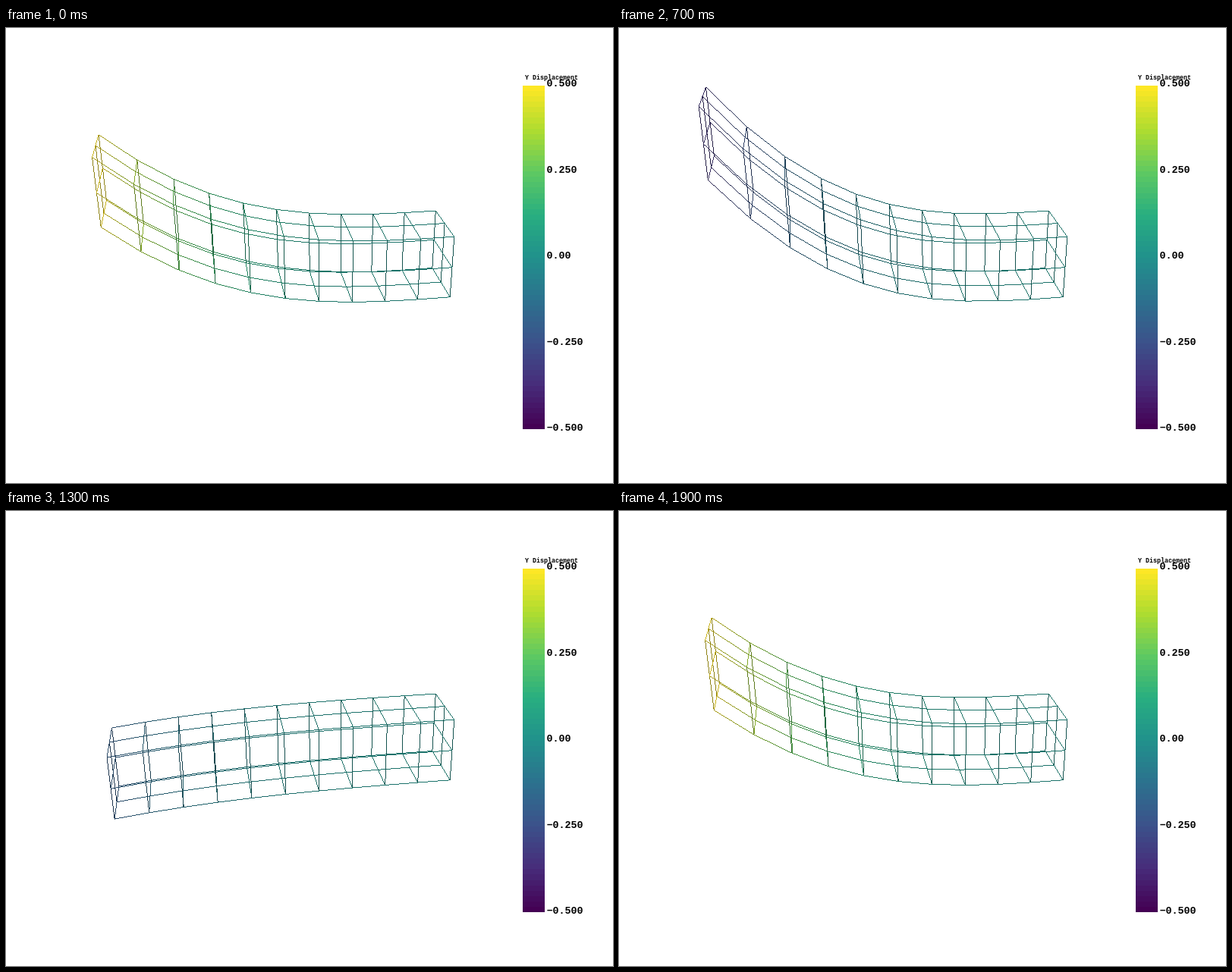
An HTML page with a canvas for the animation above (2 s loop, 800 by 600 pixels).

```html
<!DOCTYPE html>
<html lang="en">
<head>
<meta charset="utf-8">
<title>Beam vibration</title>
<style>
  html, body { margin: 0; width: 100%; height: 100%; overflow: hidden; background: #fff; }
  canvas { display: block; }
</style>
</head>
<body>
<canvas id="stage" width="800" height="600"></canvas>
<script>
const ctx = document.getElementById('stage').getContext('2d');
const STEPS = 20, STEP_MS = 100;
const CELLS = 10, CELL = 0.5;

// Camera: position, view axes and a 30 degree vertical view angle
const EYE = [11.9151263, 6.1139275, 3.6124957];
const FOCUS = [0, 0.375, 2];
const UP = [-0.4254644, 0.9024244, -0.0678985];
const FOCAL = 300 / Math.tan(Math.PI / 12);

const dot = (a, b) => a[0] * b[0] + a[1] * b[1] + a[2] * b[2];
const sub = (a, b) => a.map((v, i) => v - b[i]);
const unit = a => a.map(v => v / Math.hypot(...a));
const cross = (a, b) => [
  a[1] * b[2] - a[2] * b[1],
  a[2] * b[0] - a[0] * b[2],
  a[0] * b[1] - a[1] * b[0]
];
const mix = (a, b, t) => a.map((v, i) => v + (b[i] - v) * t);
const css = c => `rgb(${c.map(Math.round).join(',')})`;

const BACK = unit(sub(EYE, FOCUS));
const RIGHT = cross(UP, BACK);

// Viridis colour map
const STOPS = ['440154', '472d7b', '3b528b', '2c728e', '21918c', '28ae80', '5ec962', 'addc30', 'fde725']
  .map(h => [0, 2, 4].map(i => parseInt(h.slice(i, i + 2), 16)));

function viridis(t) {
  const p = Math.min(1, Math.max(0, t)) * (STOPS.length - 1);
  const i = Math.min(STOPS.length - 2, Math.floor(p));
  return mix(STOPS[i], STOPS[i + 1], p - i);
}

// Lights fixed to the camera: key from above, fill from below, headlight
const LIGHTS = [
  { dir: [0.112, 0.766, 0.633], tint: [0.75, 0.73, 0.68] },
  { dir: [0, -0.966, 0.259], tint: [0.24, 0.25, 0.26] },
  { dir: [0, 0, 1], tint: [0.25, 0.25, 0.25] }
];

// A line is lit with the normal that faces the viewer most
function shade(a, b) {
  const d = unit(sub(b, a));
  const flat = Math.hypot(d[0], d[1]) || 1e-6;
  const n = [-d[2] * d[0] / flat, -d[2] * d[1] / flat, flat];
  const sum = [0, 0, 0];
  for (const { dir, tint } of LIGHTS) {
    const power = Math.max(0, dot(n, dir));
    tint.forEach((v, i) => sum[i] += v * power);
  }
  return sum.map(v => Math.min(1, v));
}

// Nodes are [x, y, z] grid indices; edges outline the outer cell faces
const edges = [];
const RING = [[0, 0], [1, 0], [2, 0], [2, 1], [2, 2], [1, 2], [0, 2], [0, 1]];
for (let k = 0; k <= CELLS; k++) {
  RING.forEach(([x, y], i) => {
    const [nx, ny] = RING[(i + 1) % 8];
    if (k < CELLS) edges.push([[x, y, k], [x, y, k + 1]]);
    edges.push([[x, y, k], [nx, ny, k]]);
    if ((k === 0 || k === CELLS) && i % 2) edges.push([[x, y, k], [1, 1, k]]);
  });
}

const bend = z => z ** 3 / 250;

function makeNode([i, j, k], lift, level) {
  const z = k * CELL;
  const rel = sub([i * CELL, j * CELL + bend(z) * lift, z], EYE);
  const view = [dot(rel, RIGHT), dot(rel, UP), dot(rel, BACK)];
  const scale = FOCAL / -view[2];
  return {
    view,
    pos: [400 + view[0] * scale, 300 - view[1] * scale],
    color: viridis(0.5 + bend(z) * level)
  };
}

// One-pixel line without smoothing, colours blended along its length
function drawLine(a, b) {
  const light = shade(a.view, b.view);
  const steep = Math.abs(b.pos[1] - a.pos[1]) > Math.abs(b.pos[0] - a.pos[0]);
  const m = steep ? 1 : 0;
  if (a.pos[m] > b.pos[m]) [a, b] = [b, a];
  const start = a.pos[m], span = b.pos[m] - start;
  for (let p = Math.round(start); p < Math.round(b.pos[m]); p++) {
    const t = (p + 0.5 - start) / span;
    const q = Math.floor(a.pos[1 - m] + (b.pos[1 - m] - a.pos[1 - m]) * t);
    ctx.fillStyle = css(mix(a.color, b.color, t).map((v, i) => v * light[i]));
    ctx.fillRect(steep ? q : p, steep ? p : q, 1, 1);
  }
}

function drawBeam(step) {
  // Every step adds its displacement to the shape so far
  let lift = 2, level = 0;
  for (let i = 0; i <= step; i++) {
    level = Math.cos(2 * Math.PI * i / (STEPS - 1));
    lift += level;
  }
  for (const [p, q] of edges) drawLine(makeNode(p, lift, level), makeNode(q, lift, level));
}

function drawScale() {
  const bands = 64, top = 76, height = 453;
  for (let i = 0; i < bands; i++) {
    const y0 = Math.round(top + height * i / bands);
    const y1 = Math.round(top + height * (i + 1) / bands);
    ctx.fillStyle = css(viridis(1 - i / (bands - 1)));
    ctx.fillRect(681, y0, 29, y1 - y0);
  }
  ctx.fillStyle = '#000';
  ctx.font = 'bold 8.33px "Liberation Mono", monospace';
  ctx.fillText('Y Displacement', 684, 68);
  ctx.font = 'bold 13.33px "Liberation Mono", monospace';
  ['0.500', '0.250', '0.00', '\u22120.250', '\u22120.500']
    .forEach((label, i) => ctx.fillText(label, 712.5, 77 + i * 113.5));
}

function draw(step) {
  ctx.fillStyle = '#fff';
  ctx.fillRect(0, 0, 800, 600);
  drawBeam(step);
  drawScale();
}

const begin = performance.now();
let shown = -1;
function tick(now) {
  const step = Math.floor(Math.max(0, now - begin) / STEP_MS) % STEPS;
  if (step !== shown) draw(shown = step);
  requestAnimationFrame(tick);
}
tick(begin);
</script>
</body>
</html>
```
